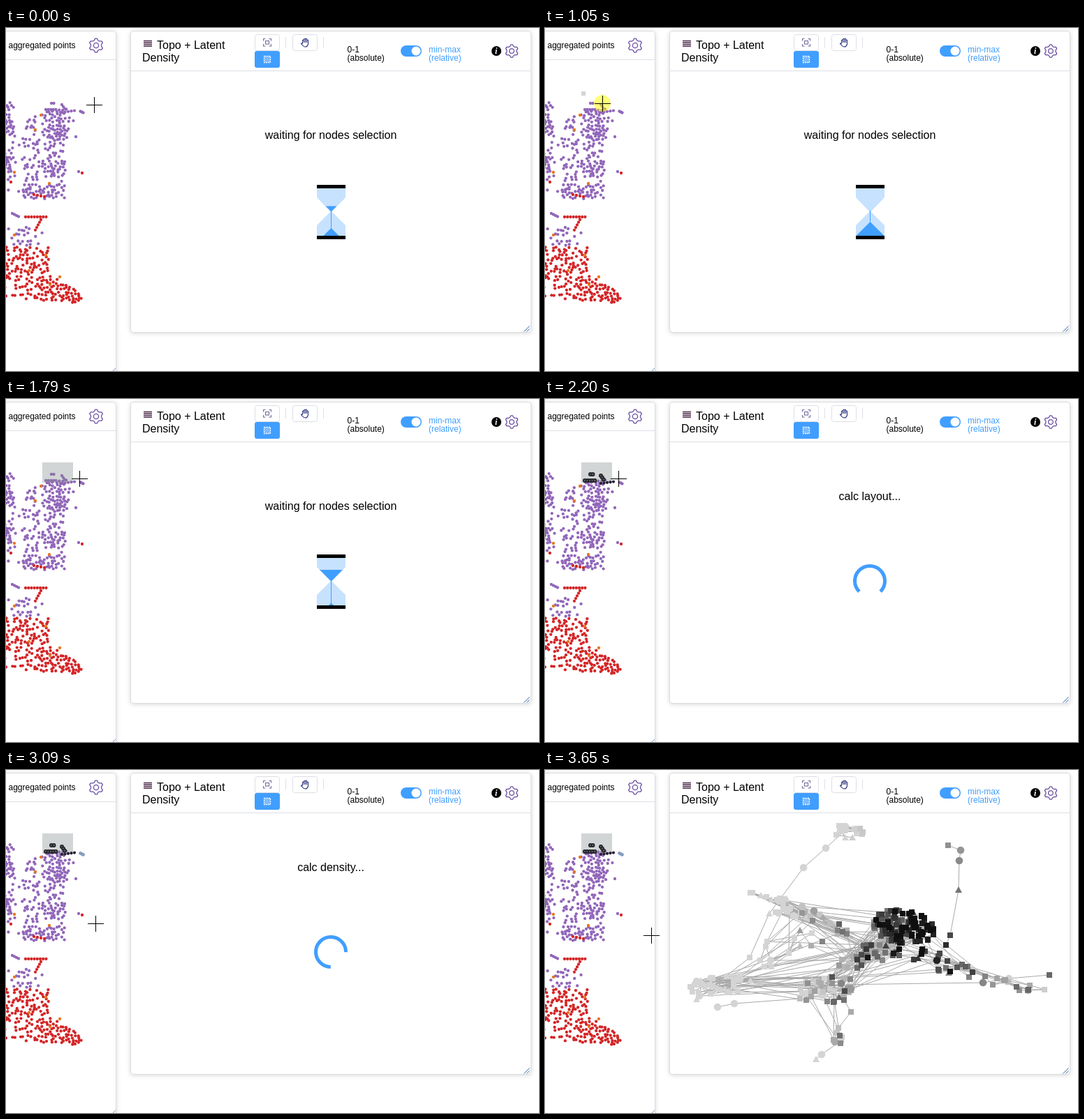
Animation, 763 px wide and 492 px high, one loop 3850 ms. Source, as an HTML page:

```html
<!DOCTYPE html>
<html lang="en">
<head>
<meta charset="utf-8">
<title>Topo + Latent Density</title>
<style>
html, body { margin: 0; width: 100%; height: 100%; overflow: hidden; background: #fff; }
svg { display: block; width: 763px; height: 492px; }
text { font-family: "Liberation Sans", Arial, sans-serif; font-size: 12px; }
.big { font-size: 16px; }
.panel { fill: #fff; stroke: #dcdde0; filter: drop-shadow(0 1px 3px rgba(0,0,0,.16)); }
.line { fill: none; stroke: #dcdfe6; }
.gear { fill: none; stroke: #6a4fa3; stroke-width: 1.3; stroke-linejoin: round; }
.grip { fill: none; stroke: #3f6fa8; }
.edge { fill: none; stroke: #a9a9a9; }
.blue { fill: #409eff; }
</style>
</head>
<body>
<svg viewBox="0 0 763 492">
  <rect class="panel" x="-20.5" y="4.5" width="178" height="520" rx="4"/>
  <path class="line" d="M0 45.5H157"/>
  <text x="3.5" y="29">aggregated points</text>
  <path class="grip" d="M153 492l4-4" stroke-opacity=".7"/>

  <rect class="panel" x="178.5" y="4.5" width="573" height="432" rx="4"/>
  <path class="line" d="M179 61.5H751"/>
  <path d="M197 18.5h12M197 21h12M197 23.5h12M197 26h12" stroke="#4a2848" stroke-width="1.3"/>
  <text class="big" x="216" y="30">Topo + Latent</text>
  <text class="big" x="195" y="48">Density</text>

  <g class="line">
    <rect x="356.5" y="9.5" width="35" height="23" rx="3"/>
    <rect x="410.5" y="9.5" width="35" height="23" rx="3"/>
    <path d="M400.5 13v15M454.5 13v15"/>
  </g>
  <rect class="blue" x="356" y="33" width="36" height="24" rx="3"/>
  <g fill="none" stroke="#75699b" stroke-width="1.1">
    <path d="M368.5 18.5v-3h3M376.500 15.500h3v3M379.500 23v3h-3M371.500 26h-3v-3"/>
    <rect x="371.500" y="18.500" width="5" height="4.500"/>
  </g>
  <rect x="369.500" y="40.500" width="9" height="9" fill="#fff" fill-opacity=".3" stroke="#fff" stroke-width="1.300" stroke-dasharray="2 1.200"/>
  <path d="M424.500 22.500V17.500q1-1 2 0v3V16q1-1 2 0v4.500V15.500q1-1 2 0v5V17.500q1-1 2 0V23q-1 4-4 4q-2.500 0-6-4.500q.5-1.500 2 0" fill="none" stroke="#2f3581" stroke-width="1.150" stroke-linejoin="round"/>

  <text x="488.500" y="35">0-1</text>
  <text x="488.500" y="47">(absolute)</text>
  <rect class="blue" x="565" y="25" width="30" height="16" rx="8"/>
  <circle cx="587" cy="33" r="6.500" fill="#fff"/>
  <text class="blue" x="605" y="35">min-max</text>
  <text class="blue" x="605" y="47">(relative)</text>
  <circle cx="702" cy="33" r="7"/>
  <text x="700" y="37" fill="#fff" style="font:italic bold 12px 'Liberation Serif',serif">i</text>
  <path id="gears" class="gear"/>
  <path class="grip" d="M741.500 435.500l8-8M745.500 435.500l4-4"/>

  <g id="dots"></g>
  <rect id="sel" x="52" y="91" fill="#7c8888" fill-opacity=".35"/>
  <g id="picked" fill="#5c5a66" stroke="#1d1d22" stroke-width="1.5"></g>

  <text id="msg" class="big" x="465" text-anchor="middle"></text>
  <g id="glass">
    <path d="M445 229h41v14l-19.500 20.500L486 283v16h-41v-16l19.500-19.500L445 243Z" fill="#c6e2ff"/>
    <path id="sand" class="blue"/>
    <path d="M445 225h41v5h-41ZM445 298h41v5h-41Z"/>
  </g>
  <circle id="ring" cx="465" cy="261" r="21.500" pathLength="360" stroke-dasharray="270 90" fill="none" stroke="#409eff" stroke-width="5"/>
  <g id="graph"></g>

  <g id="cursor">
    <circle id="press" r="12" fill="#ff0" fill-opacity=".52"/>
    <path d="M-11 .5h23M.5-11v23" stroke="#000" shape-rendering="crispEdges"/>
  </g>
</svg>
<script>
const $ = id => document.getElementById(id);
const LOOP = 3850;

let seed = 11;
function rnd() {
  seed = (seed * 1664525 + 1013904223) % 4294967296;
  return seed / 4294967296;
}
const pick = list => list[Math.floor(rnd() * list.length)];
const between = (a, b) => a + (b - a) * rnd();
const show = (el, on) => el.setAttribute("visibility", on ? "visible" : "hidden");

// ---- gears
function gear(cx, cy, r) {
  let d = "";
  for (let i = 0; i < 24; i++) {
    const a = i * Math.PI / 12 - .13, q = i % 4 < 2 ? r : r * .76;
    d += `${i ? "L" : "M"}${cx + q * Math.sin(a)} ${cy - q * Math.cos(a)}`;
  }
  const h = r * .36;
  return d + `ZM${cx - h} ${cy}a${h} ${h} 0 1 0 ${2 * h} 0a${h} ${h} 0 1 0 ${-2 * h} 0`;
}
$("gears").setAttribute("d", gear(129, 25, 10) + gear(724, 33, 9.3));

// ---- scatter plot
const PURPLE = "#9166ba", RED = "#d42527", ORANGE = "#e6761e";
const dot = ([x, y], r = 2.15) => `<circle cx="${x.toFixed(1)}" cy="${y.toFixed(1)}" r="${r}"/>`;
const paint = (points, color) => `<g fill="${color}">${points.map(p => dot(p)).join("")}</g>`;
const row = (n, x, y, dx, dy = 0) => Array.from({ length: n }, (_, i) => [x + i * dx, y + i * dy]);

// n spaced random points between two heights, kept by chance
function scatter(n, y0, y1, chance) {
  const out = [];
  for (let tries = 0; out.length < n && tries < 9000; tries++) {
    const x = between(-2, 110), y = between(y0, y1);
    if (rnd() < chance(x, y) && out.every(p => Math.hypot(p[0] - x, p[1] - y) > 2.6)) out.push([x, y]);
  }
  return out;
}
const bump = (v, mid, width) => Math.exp(-(((v - mid) / width) ** 2));

function purpleChance(x, y) {
  const edge = y < 175 ? 104 - (y - 115) * .4 : 86;
  const notch = x > 12 && y < 146 - x * .5 || x > 50 && y < 116;
  if (x > edge || notch) return 0;
  const strip = Math.max(bump(x, 72, 16), .8 * bump(x, 4, 9), .45 * bump(x, 36, 12));
  return y > 224 ? (x > 24 ? 1 : .06) : strip * (.3 + .7 * Math.max(bump(y, 135, 26), bump(y, 197, 11)));
}
function redChance(x, y) {
  const edge = 61 + Math.max(0, y - 352) * 1.6;
  if (x > edge || y > 386 + x * .09) return 0;
  return y > 370 && x > 60 ? 1 : .45;
}
const chosen = [...row(5, 57, 117, 3.6), ...row(2, 65, 108, 3.5), ...row(3, 80, 110, 2, 2.8)];
const fringe = row(5, 80, 121, 4.5, -.6);
const hovered = row(3, 106.5, 119.5, 2, 1);

$("dots").innerHTML =
  paint([...scatter(235, 107, 220, purpleChance), ...scatter(54, 224, 245, purpleChance),
    ...scatter(22, 286, 314, x => bump(x, 28, 15)), ...row(4, 9, 266, 3, 1.5),
    ...chosen, ...fringe, ...hovered, [100, 156], [104, 206]], PURPLE) +
  paint([...scatter(182, 314, 396, redChance), ...row(8, 28, 271, 4.2), ...row(5, 50, 275, -2, 3.7),
    ...row(4, 40, 239, 5, 1), [109, 208], [7, 221]], RED) +
  paint([[50, 125], [42, 146], [12, 207], [62, 223], [57, 326], [33, 348], [77, 357], [63, 368], [12, 297]], ORANGE) +
  `<g id="hover">${paint(hovered, "#83a0bd")}</g>`;
$("picked").innerHTML = chosen.map(p => dot(p, 2.2)).join("") + fringe.map(p => dot(p, 1.2)).join("");

// ---- network
const nodes = [];
let edges = "";
const link = (a, b) => edges += `M${a.x} ${a.y}L${b.x} ${b.y}`;

// nodes fade with distance from the dense spot
function node(x, y, kind) {
  const far = Math.hypot(x - 545, y - 230);
  const shade = Math.min(212, 28 + far * 1.1 + between(-22, 35)) - (x > 360 && y > 190 && far < 220 ? 110 * rnd() ** 3 : 0);
  kind ||= rnd() > (shade > 180 ? .4 : .06) ? "square" : pick(["triangle", "triangle", "circle"]);
  const n = { x: Math.round(x), y: Math.round(y), kind, shade: Math.max(15, Math.round(shade)) };
  nodes.push(n);
  return n;
}

const groups = {
  core: { at: [513, 225], size: [43, 23], tilt: .12, n: 115, to: "mid" },
  mid: { at: [463, 266], size: [46, 17], tilt: -.3, n: 34, to: "core" },
  upper: { at: [362, 204], size: [68, 14], tilt: .4, n: 36, to: "mid" },
  left: { at: [250, 309], size: [46, 14], tilt: -.1, n: 32, to: "low" },
  low: { at: [400, 314], size: [40, 21], tilt: -.1, n: 44, to: "mid" },
  ridge: { at: [556, 274], size: [72, 13], tilt: .28, n: 24, to: "core" },
  right: { at: [674, 308], size: [42, 10], tilt: .1, n: 12, to: "ridge" },
  between: { at: [345, 255], size: [54, 24], tilt: -.25, n: 13, to: "left" },
  top: { at: [433, 89], size: [23, 9], tilt: .05, n: 15 },
  tail: { at: [421, 382], size: [9, 11], tilt: 0, n: 6, to: "low" }
};
for (const g of Object.values(groups)) {
  g.nodes = [];
  for (let i = 0; i < g.n; i++) {
    const a = rnd() * 2 * Math.PI, r = rnd() ** .55 * 1.05;
    const dx = r * Math.cos(a) * g.size[0];
    const n = node(g.at[0] + dx, g.at[1] + r * Math.sin(a) * g.size[1] + g.tilt * dx);
    if (i) link(n, pick(g.nodes));
    g.nodes.push(n);
  }
}
for (const g of Object.values(groups))
  if (g.to) g.nodes.forEach(n => rnd() < .5 && link(n, pick(groups[g.to].nodes)));
for (const [a, b] of [["left", "mid"], ["upper", "core"], ["between", "mid"], ["between", "upper"], ["low", "ridge"]])
  for (let i = 0; i < 7; i++) link(pick(groups[a].nodes), pick(groups[b].nodes));

function chain(...points) {
  points.map(p => node(...p)).reduce((a, b) => (link(a, b), b));
}
chain([430, 86, "circle"], [402, 112, "circle"], [370, 140, "circle"], [321, 206], [293, 269], [217, 329]);
chain([577, 108], [595, 115, "circle"], [593, 130, "circle"], [592, 172, "triangle"], [580, 237], [574, 251]);
chain([428, 330], [438, 347], [420, 370], [424, 388], [396, 408, "circle"], [388, 415, "triangle"]);
chain([208, 311], [627, 305, "circle"], [664, 299, "circle"], [722, 294]);
chain([247, 340, "circle"], [271, 335, "circle"], [365, 328]);
chain([297, 176], [309, 180, "triangle"], [385, 202, "circle"]);

const shapes = {
  square: "m-4-4h8v8h-8Z",
  triangle: "m0-5l5 9h-10Z",
  circle: "m-5.3 0a5.3 5.3 0 1 0 10.6 0a5.3 5.3 0 1 0-10.6 0"
};
$("graph").innerHTML = `<path class="edge" d="${edges}"/>` +
  nodes.sort((a, b) => b.shade - a.shade).map(n =>
    `<path d="M${n.x} ${n.y}${shapes[n.kind]}" fill="rgb(${n.shade},${n.shade},${n.shade})"/>`).join("");

// ---- motion: the picture advances in even steps
const STEP = 68.05, LEAD = 8, LAST = 53;
const snap = t => LEAD + STEP * Math.min(LAST, Math.max(0, Math.floor((t - LEAD) / STEP)));
const CLICK = 770, RELEASE = 1720, LAYOUT = 1860, DENSITY = 3020, DONE = 3540;

const ramp = (t, a, b) => Math.min(1, Math.max(0, (t - a) / (b - a)));
const smooth = k => k * k * (3 - 2 * k);

// linear track of [time, x, y]
function track(keys, t) {
  const i = Math.max(1, keys.findIndex(k => k[0] >= t));
  const [a, b] = t > keys.at(-1)[0] ? keys.slice(-2) : [keys[i - 1], keys[i]];
  const k = ramp(t, a[0], b[0]);
  return [1, 2].map(j => a[j] + (b[j] - a[j]) * k);
}
const pointer = [[70, 126, 110], [550, 69, 100], [750, 52, 91], [890, 52, 91], [1028, 82, 108],
  [1368, 95, 119], [1600, 98, 121], [1720, 105, 114], [2270, 105, 114], [2540, 112, 120],
  [2880, 112, 120], [3270, 144, 326], [3412, 144, 326], [3610, 152, 237]];
const box = [[960, 0, 0], [1028, 6, 6], [1368, 41, 26], [1600, 44, 29]];

function sandPath(t, flipped) {
  const fallen = flipped ? Math.max(0, t - 1380) * .009 : Math.min(20, 11 + t * .009);
  const left = flipped ? 20 - fallen : Math.max(0, 8 - t * .008);
  const stream = fallen && t < 1090 || flipped && fallen ? "M465 262h1v36h-1Z" : "";
  return `M465.5 263.5l${-left} ${-left}h${2 * left}ZM465.5 ${298 - fallen}l${fallen} ${fallen}h${-2 * fallen}Z` + stream;
}

function draw(time) {
  const t = snap(time);
  const waiting = t < LAYOUT, done = t >= DONE;

  $("cursor").setAttribute("transform", `translate(${track(pointer, t).map(Math.round).join(" ")})`);
  show($("press"), t >= CLICK && t < RELEASE);

  const [w, h] = track(box, t);
  $("sel").setAttribute("width", w);
  $("sel").setAttribute("height", h);
  show($("picked"), t >= 1790);
  show($("hover"), t >= 2540);

  $("msg").textContent = waiting ? "waiting for nodes selection" : t < DENSITY ? "calc layout..." : "calc density...";
  $("msg").setAttribute("y", waiting ? 159 : 145);
  show($("msg"), !done);

  const turn = smooth(ramp(t, 1060, 1360)), flipped = turn === 1;
  $("glass").setAttribute("transform", flipped ? "translate(0 -2)" : `rotate(${180 * turn} 465.5 263)`);
  $("sand").setAttribute("d", sandPath(t, flipped));
  show($("glass"), waiting);

  $("ring").setAttribute("transform", `rotate(${135 + (t - 2186) * .357} 465 261)`);
  show($("ring"), !waiting && !done);
  show($("graph"), done);
}

const start = performance.now();
function tick() {
  draw((performance.now() - start) % LOOP);
  requestAnimationFrame(tick);
}
tick();
</script>
</body>
</html>
```
